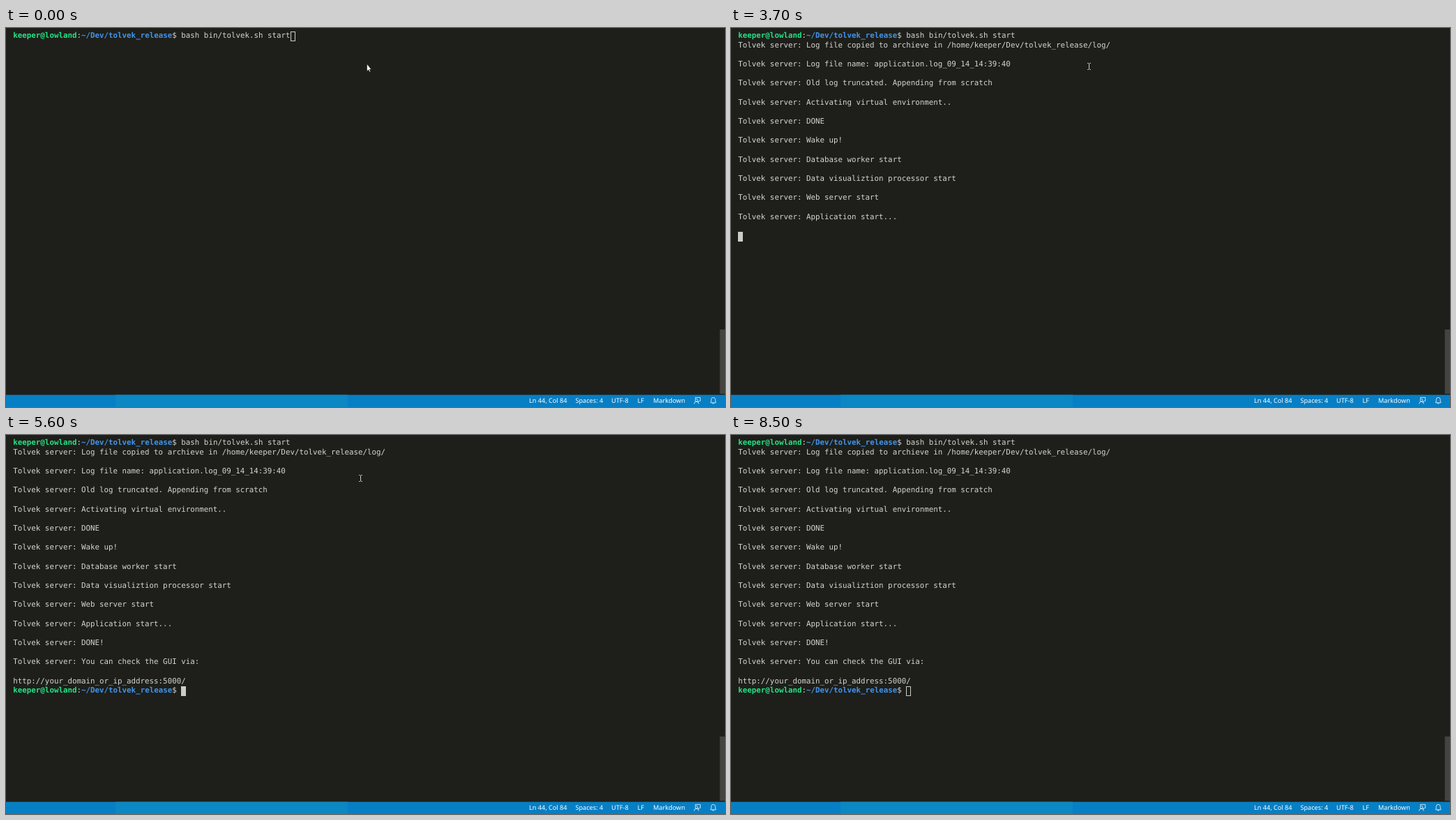
Recreate the animation shown at these times as an HTML page with a canvas. Size 1031x543 px, loop 8.6 s.

```html
<!DOCTYPE html>
<html lang="en">
<head>
<meta charset="utf-8">
<title>Terminal session</title>
<style>
  html, body { margin: 0; width: 100%; height: 100%; overflow: hidden; background: #1e1f1a; }
  canvas { display: block; }
</style>
</head>
<body>
<canvas width="1031" height="543"></canvas>
<script>
const ctx = document.querySelector('canvas').getContext('2d');
const LOOP = 8600;
const LEFT = 10.3, BASELINE = 13.9, ROW = 13.67, COLUMN = 6.514;
const FOREGROUND = '#d4d4d0', CURSOR = '#cbcbc8', GREEN = '#23e586', BLUE = '#4294ec';
const MONO = '10.82px "DejaVu Sans Mono", monospace';
const SANS = '9.15px "Noto Sans", sans-serif';

const USER = 'keeper@lowland', PATH = '~/Dev/tolvek_release';
const COMMAND = 'bash bin/tolvek.sh start';
const PROMPT_COLUMNS = USER.length + PATH.length + 3;

const startLog = [
  'Log file copied to archieve in /home/keeper/Dev/tolvek_release/log/',
  'Log file name: application.log_09_14_14:39:40',
  'Old log truncated. Appending from scratch',
  'Activating virtual environment..',
  'DONE',
  'Wake up!',
  'Database worker start',
  'Data visualiztion processor start',
  'Web server start',
  'Application start...'
];
const doneLog = ['DONE!', 'You can check the GUI via:'];

// Pointer positions: [time, x, y], each held until the next.
const pointerPath = [
  [100, 518, 53], [3600, 516, 54], [3700, 513, 55],
  [4900, 514, 58], [5000, 515, 63], [5100, 516, 68],
  [5300, 516, 72], [5400, 513, 70], [5500, 510, 66], [5600, 508, 62],
  [5700, 506, 61], [5800, 505, 61], [5900, 503, 61],
  [7300, 499, 59], [7400, 465, 50], [7500, 419, 42],
  [7700, 352, 31], [7800, 215, 17], [7900, 14, 5], [8000, -20, -20]
];

function rect(x, y, w, h, color) {
  ctx.fillStyle = color;
  ctx.fillRect(x, y, w, h);
}

function write(text, column, row, color = FOREGROUND, weight = '') {
  ctx.font = `${weight} ${MONO}`;
  ctx.fillStyle = color;
  ctx.fillText(text, LEFT + column * COLUMN, BASELINE + row * ROW);
}

function writePrompt(row) {
  const pathColumn = USER.length + 1;
  write(USER, 0, row, GREEN, 'bold');
  write(':', USER.length, row);
  write(PATH, pathColumn, row, BLUE, 'bold');
  write('$', pathColumn + PATH.length, row);
}

function writeLog(lines, firstRow) {
  lines.forEach((line, i) => write('Tolvek server: ' + line, 0, firstRow + 2 * i));
}

function drawCursor(column, row, hollow) {
  const x = Math.round(LEFT + column * COLUMN), y = Math.round(4.6 + row * ROW);
  if (hollow) {
    ctx.strokeStyle = CURSOR;
    ctx.lineWidth = 1;
    ctx.strokeRect(x + .5, y + .5, 6, 13);
  } else {
    rect(x, y, 7, 14, CURSOR);
  }
}

function drawTerminal(t) {
  writePrompt(0);
  write(COMMAND, PROMPT_COLUMNS, 0);
  if (t >= 1600) writeLog(startLog, 1);
  if (t >= 4600) {
    writeLog(doneLog, 21);
    write('http://your_domain_or_ip_address:5000/', 0, 25);
  }
  if (t >= 5000) writePrompt(26);

  if (t < 1500) drawCursor(PROMPT_COLUMNS + COMMAND.length, 0, t < 100);
  else if (t < 1600) drawCursor(0, 1);
  else if (t < 4600) drawCursor(0, 21);
  else if (t < 5000) drawCursor(0, 26);
  else drawCursor(PROMPT_COLUMNS, 26, t >= 8500);
}

function drawArrow() {
  const arrow = new Path2D('M517.5 51.5V62l2.3-2.1 1.5 3.2 1.5-.7-1.5-3.1h2.6z');
  ctx.fillStyle = '#fff';
  ctx.fill(arrow);
  ctx.strokeStyle = '#111';
  ctx.lineWidth = .6;
  ctx.stroke(arrow);
}

function drawBeam(x, y) {
  rect(x, y - 4, 1, 8, '#d0d0cd');
  for (const serifY of [y - 5, y + 4]) {
    rect(x - 2, serifY, 2, 1, '#b0b0ad');
    rect(x + 1, serifY, 2, 1, '#b0b0ad');
  }
}

function drawStatusBar() {
  rect(0, 525.6, 1031, 18, '#077fc5');
  rect(157, 525.6, 333, 18, '#0b87c4');
  ctx.font = SANS;
  ctx.fillStyle = '#fff';
  [['Ln 44, Col 84', 750], ['Spaces: 4', 816.5], ['UTF-8', 868], ['LF', 905.5], ['Markdown', 928]]
    .forEach(([label, x]) => ctx.fillText(label, x, 537.3));

  ctx.strokeStyle = '#e8f3fa';
  ctx.lineWidth = .85;
  // Feedback: a person with a speech bubble.
  ctx.stroke(new Path2D('M988.5 531.2V529.4H995.6V534.4H994.4L992.7 536V534.4M991.8 533.3a1.8 1.8 0 1 1-3.6 0a1.8 1.8 0 1 1 3.6 0M986.7 538.6a3.3 3.3 0 0 1 6.6 0'));
  // Bell.
  ctx.stroke(new Path2D('M1010.3 536.8H1018.1L1017.2 535V532.4a3 3 0 0 0-6 0V535zM1013 537.1a1.2 1.2 0 0 0 2.4 0'));
}

function draw(t) {
  rect(0, 0, 1031, 543, '#1e1f1a');
  rect(1023.6, 432, 7.4, 92, '#444541');
  drawTerminal(t);
  drawStatusBar();
  const pointer = pointerPath.findLast(([time]) => time <= t);
  if (pointer) drawBeam(pointer[1], pointer[2]);
  else drawArrow();
}

ctx.textRendering = 'geometricPrecision';
const start = performance.now();
function tick() {
  draw((performance.now() - start) % LOOP);
  requestAnimationFrame(tick);
}
tick();
</script>
</body>
</html>
```
